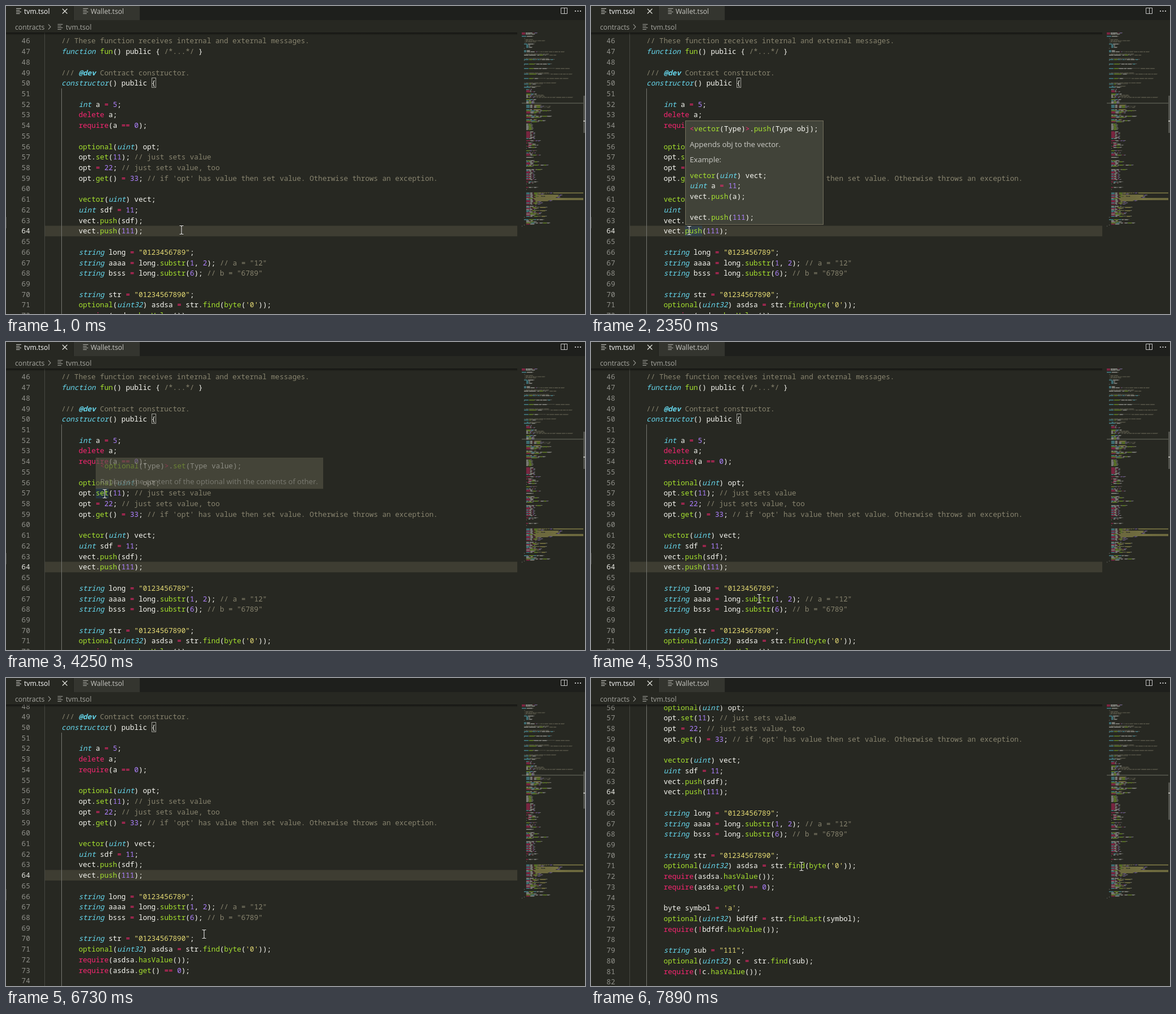
An HTML page with a canvas that plays this animation: 1026 by 546 pixels, repeating every 8000 ms.

```html
<!DOCTYPE html>
<html lang="en">
<head>
<meta charset="utf-8">
<title>Code editor hover hints</title>
<style>
  html, body { margin: 0; width: 100%; height: 100%; overflow: hidden; background: #272822; }
  canvas { display: block; }
</style>
</head>
<body>
<canvas id="stage" width="1026" height="546"></canvas>
<script>
const LOOP = 8000, STEP = 60;
const CHAR = 7.586, LINE = 18.72, CODE_X = 68, TOP = 47;
const MONO = "12.643px 'Noto Sans Mono', monospace";
const UI = "'Open Sans', sans-serif";
const ctx = document.getElementById('stage').getContext('2d');
const long = n => '"' + '0'.repeat(n) + '"';

const source = `pragma ton-solidity >= 0.38;
pragma AbiHeader expire;

contract TvmExample {

    /*
     * State samples
     * Each one is used in a sample below.
     * See contract calls.
     */
    struct SomeStruct {
        uint a;
        uint b;
        uint value;
    }

    uint value;
    uint public counter = 0; // a set of fields, filled on deploy and update.

    // Modifier that allows to accept some calls.
    modifier alwaysAccept { tvm.accept(); _; } // checks value


    // Sums of all numbers up to the given value.
    function getSum(uint a, uint b) public returns (uint) {
    }


    function getCounter() public pure returns (uint) {
    }


    function onBounce(TvmSlice body) external { /*...*/ } // receives bounced messages



    // These functions receive internal messages.
    function onCodeUpgrade() private { /*...*/ } // this function is used after the update.



    function receive() public { /*...*/ } // this function receives plain transfers.



    // These function receives internal and external messages.
    function fun() public { /*...*/ }

    /// @dev Contract constructor.
    constructor() public {

        int a = 5;
        delete a;
        require(a == 0);

        optional(uint) opt;
        opt.set(11); // just sets value
        opt = 22; // just sets value, too
        opt.get() = 33; // if 'opt' has value then set value. Otherwise throws an exception.

        vector(uint) vect;
        uint sdf = 11;
        vect.push(sdf);
        vect.push(111);

        string long = "0123456789";
        string aaaa = long.substr(1, 2); // a = "12"
        string bsss = long.substr(6); // b = "6789"

        string str = "01234567890";
        optional(uint32) asdsa = str.find(byte('0'));
        require(asdsa.hasValue());
        require(asdsa.get() == 0);

        byte symbol = 'a';
        optional(uint32) bdfdf = str.findLast(symbol);
        require(!bdfdf.hasValue());

        string sub = "111";
        optional(uint32) c = str.find(sub);
        require(!c.hasValue());

        opt.get();
        opt.reset();
        vect.pop();
        vect.last();
        vect.empty();
        opt.reset();

        delete value;
        require(a == 1);
        require(b == 2);
        delete sdf;
        require(c == 3);
        delete counter;
        uint right = 10;

        require(value == 10, 101);

        if (value) {
            return value;
            value.store(a, b);
        } else {
            value.store(b);
        }

        repeat(10) { a++; }

        uint sum = a + 1;
        delete sum;
        require(sum.empty() == 0);

        TvmBuilder b;


        b.store(value);
        uint depth = b.depth();
        delete depth;
        require(sum);
        uint bits = b.remBits() + value.bits(1);
        b.storeRef();


        TvmSlice slice = b.toSlice();
        uint size = 1;
        require(a == 0);
        delete size;
        uint refs = 2;
        require(b == 0);
        uint data = 3;
        require(c == 1);
        uint next = 4;
        require(sum == 5);

        for (uint i : vect) {
            sum += i;
        }


        for (byte b : data) {

        }


        string str1 = format("Hello 0x{:X} or {}", 255, ${long(55)});
        string str2 = format("{}", 123);
        require(str2 == ${long(40)}, 102);
        string str3 = format("value {}", ${long(24)});
        require(str3 == ${long(36)}, 103);
        str1.append(${long(120)});
        string str4 = ${long(120)};
        require(str1 == ${long(22)}, 104);
        require(str4 == "10", 105);
        string hex = format("{}", 15);
        require(hex == "0f", 106);

        fixed decimal = 1;
        string d = format("{}", "0000000000");
        require(d == "1.000");
        fixed other = 2;
        string e = format("{}", "1.0000000");
        uint number = 10;
        require(stoi("123") == 123);
        number.append(stoi("45"));
        require(number);
        string last = format("{}", "number");
    }

    function setValue(uint val) public {
        value = val;
        counter.store(val);
        optional(uint32) next = value.getNext(val);
        delete counter;
    }
}`.split('\n');

const TOKEN = /(\/\*.*?(?:\*\/|$)|^ +\*.*|\/\/\/ (?=@)|(?<=@dev).+|\/\/.*)|(@dev)|("[^"]*"|'[^']*')|\b(\d+)\b|\b(function|constructor|contract|struct|uint32|uint|int|string)\b|\b(require|delete|pragma|return|if|else|for)\b|([=!<>+]+)|(\w+(?=\())|\w+|[^\w\s]/g;
const STYLES = [
  ['#f8f8f2', '500 '], ['#88846f', '500 '], ['#66d9ef', 'italic bold '], ['#e6db74', '500 '], ['#ae81ff', '500 '],
  ['#66d9ef', 'italic 500 '], ['#f92672', '500 '], ['#f92672', '500 '], ['#a6e22e', '500 '],
];
const tokenize = text => [...text.matchAll(TOKEN)].map(m => {
  const kind = m.slice(1).findIndex(group => group !== undefined) + 1;
  return { text: m[0], col: m.index, color: STYLES[kind][0], font: STYLES[kind][1] + MONO };
});
const lines = source.map(tokenize);

// Each block is [isCode, ...lines].
const hints = [
  { from: 2350, full: 2350, to: 3100, x: 167, y: 203, w: 245, line: 64, col: 13, len: 4, blocks: [
    [true, '<vector(Type)>.push(Type obj);'],
    [false, 'Appends obj to the vector.'],
    [false, 'Example:'],
    [true, 'vector(uint) vect;', 'uint a = 11;', 'vect.push(a);', '', 'vect.push(111);']] },
  { from: 4250, full: 4310, to: 4860, x: 159, y: 205, w: 403, line: 57, col: 12, len: 3, blocks: [
    [true, '<optional(Type)>.set(Type value);'],
    [false, 'Replaces the content of the optional with the contents of other.']] },
  { from: 5780, full: 5840, to: 6670, x: 273, y: 283, w: 686, line: 67, col: 27, len: 6, blocks: [
    [true, '<string>.substr(uint from[, uint count]) returns (string);'],
    [false, 'Returns the substring starting from the byte with number from with byte length count. Note: if count is not set',
      'then the new string will be cut from the from byte to the end of the string.'],
    [false, 'Example:'],
    [true, 'string long = "0123456789";', 'string a = long.substr(1, 2); // a = "12"',
      'string b = long.substr(6); // b = "6789"']] },
];

// Pointer moves: start time, number of steps, destination.
const moves = [
  [930, 6, 169, 398], [1600, 2, 174, 398], [3040, 4, 150, 364], [3280, 2, 139, 340],
  [3400, 8, 176, 271], [3880, 1, 175, 269], [4800, 8, 298, 456], [5410, 1, 298, 457],
  [5530, 1, 298, 455], [6670, 2, 351, 454], [6790, 11, 481, 437], [7480, 7, 373, 334],
];
const notches = [6730, 6910, 7090, 7270];

function rect(x, y, w, h, color) {
  ctx.fillStyle = color;
  ctx.fillRect(x, y, w, h);
}
function label(text, x, y, color, font) {
  ctx.fillStyle = color;
  ctx.font = font;
  ctx.fillText(text, x, y);
}
function stroke(path, color, width = 1) {
  ctx.strokeStyle = color;
  ctx.lineWidth = width;
  ctx.stroke(new Path2D(path));
}
function code(tokens, x, y) {
  for (const t of tokens) label(t.text, x + t.col * CHAR, y, t.color, t.font);
}

function pointerAt(t) {
  let x = 311, y = 397;
  for (const [start, steps, toX, toY] of moves) {
    if (t < start) break;
    const p = Math.min(1, (Math.floor((t - start) / STEP) + 1) / steps);
    const eased = p * p * (3 - 2 * p);
    x += (toX - x) * eased;
    y += (toY - y) * eased;
  }
  return [Math.round(x), Math.round(y)];
}

function drawPointer(x, y) {
  const beam = `M${x - 3.5} ${y - 7.5}h2.5l1 1l1 -1h2.5M${x} ${y - 6.5}v13M${x - 3.5} ${y + 7.5}h2.5l1 -1l1 1h2.5`;
  stroke(beam, 'rgba(0,0,0,.45)', 2.4);
  stroke(beam, '#f4f4f0', 1.1);
}

function drawHint(hint, t) {
  ctx.globalAlpha = t < hint.full ? .4 : 1;
  const height = hint.blocks.reduce((sum, block) => sum + (block.length - 1) * 18.6 + 9, 0);
  rect(hint.x, hint.y, hint.w, height, '#75715e');
  rect(hint.x + 1, hint.y + 1, hint.w - 2, height - 2, '#414339');
  let y = hint.y + 19;
  for (const [isCode, ...rows] of hint.blocks) {
    for (const row of rows) {
      if (isCode) code(tokenize(row), hint.x + 8, y);
      else label(row, hint.x + 8, y, '#ccccc7', '13.1px ' + UI);
      y += 18.6;
    }
    y += 9;
  }
  ctx.globalAlpha = 1;
}

function drawMinimap() {
  ctx.save();
  ctx.beginPath();
  ctx.rect(906, TOP, 117, 499);
  ctx.clip();
  rect(914, 171.5, 109, 1.6, '#55564c');
  ctx.globalAlpha = .55;
  lines.forEach((tokens, i) => {
    for (const t of tokens) {
      [...t.text].forEach((c, k) => {
        if (c !== ' ') rect(914 + (t.col + k) * .985, TOP + i * 1.97, .985, /\w/.test(c) ? 1.5 : .8, t.color);
      });
    }
  });
  ctx.restore();
}

function drawFileIcon(x, y, color) {
  stroke(`M${x} ${y - 4.5}h9M${x} ${y - 1.5}h6.5M${x} ${y + 1.5}h9M${x} ${y + 4.5}h6.5`, color);
}

function drawHeader() {
  rect(0, 0, 1026, 25, '#1e1f1c');
  rect(0, 0, 119, 25, '#272822');
  rect(120, 0, 117, 25, '#34352f');
  rect(0, 25, 1026, 22, '#272822');
  drawFileIcon(18, 9, '#d0d0cb');
  label('tvm.tsol', 32, 13.5, '#ffffff', '12.2px ' + UI);
  stroke('M100 5l8.5 8.5M108.5 5l-8.5 8.5', '#e4e4de', 1.2);
  drawFileIcon(136.5, 9, '#b4b4ae');
  label('Wallet.tsol', 150, 13.5, '#c6c6c1', '12.2px ' + UI);
  stroke('M983.5 3.5h11v10h-11zM989.5 3.5v10', '#c5c5c5');
  for (const x of [1008, 1012.5, 1017]) rect(x, 8, 2, 2, '#c5c5c5');
  label('contracts', 16, 41.5, '#a7a7a1', '12.2px ' + UI);
  stroke('M75 32.5l4 4.5l-4 4.5', '#a7a7a1', 1.1);
  drawFileIcon(91.5, 37, '#a7a7a1');
  label('tvm.tsol', 106, 41.5, '#a7a7a1', '12.2px ' + UI);
}

function drawEditor(t, scroll, hint) {
  const lineTop = n => 52.6 + (n - 46) * LINE - scroll;
  ctx.save();
  ctx.beginPath();
  ctx.rect(0, TOP, 906, 499);
  ctx.clip();
  if (t < notches[3]) rect(CODE_X, lineTop(64), 838, LINE, '#3e3d32');
  rect(CODE_X, TOP, 1, 499, '#464741');
  rect(98, Math.max(TOP, lineTop(51)), 1, 546, '#767771');
  if (hint) rect(CODE_X + hint.col * CHAR, lineTop(hint.line), hint.len * CHAR, LINE, 'rgba(38,79,120,.35)');
  for (let n = 46; n < 84; n++) {
    const base = lineTop(n) + 13.8;
    label(n, 27.6, base, n === 64 ? '#e8e8e2' : '#90908a', '500 ' + MONO);
    code(lines[n - 1], CODE_X, base);
  }
  ctx.strokeStyle = '#a0a09a';
  ctx.lineWidth = 1;
  ctx.strokeRect(258.5, Math.round(lineTop(50)) + .5, 7, 17);
  const shade = ctx.createLinearGradient(0, TOP, 0, TOP + 5);
  shade.addColorStop(0, 'rgba(0,0,0,.5)');
  shade.addColorStop(1, 'rgba(0,0,0,0)');
  rect(0, TOP, 906, 5, shade);
  ctx.restore();
  rect(0, 374, 1, 20, '#4c4d46');
}

function draw() {
  const t = performance.now() % LOOP;
  const scroll = notches.filter(at => t >= at).length * 49.25;
  const hint = hints.find(h => t >= h.from && t < h.to);
  rect(0, 0, 1026, 546, '#272822');
  drawEditor(t, scroll, hint);
  drawMinimap();
  rect(1023, 159 + scroll * .1335, 3, 66, '#52534d');
  rect(1023, 203, 3, 2, '#b4b4ae');
  drawHeader();
  if (hint) drawHint(hint, t);
  drawPointer(...pointerAt(t));
  requestAnimationFrame(draw);
}
draw();
</script>
</body>
</html>
```
